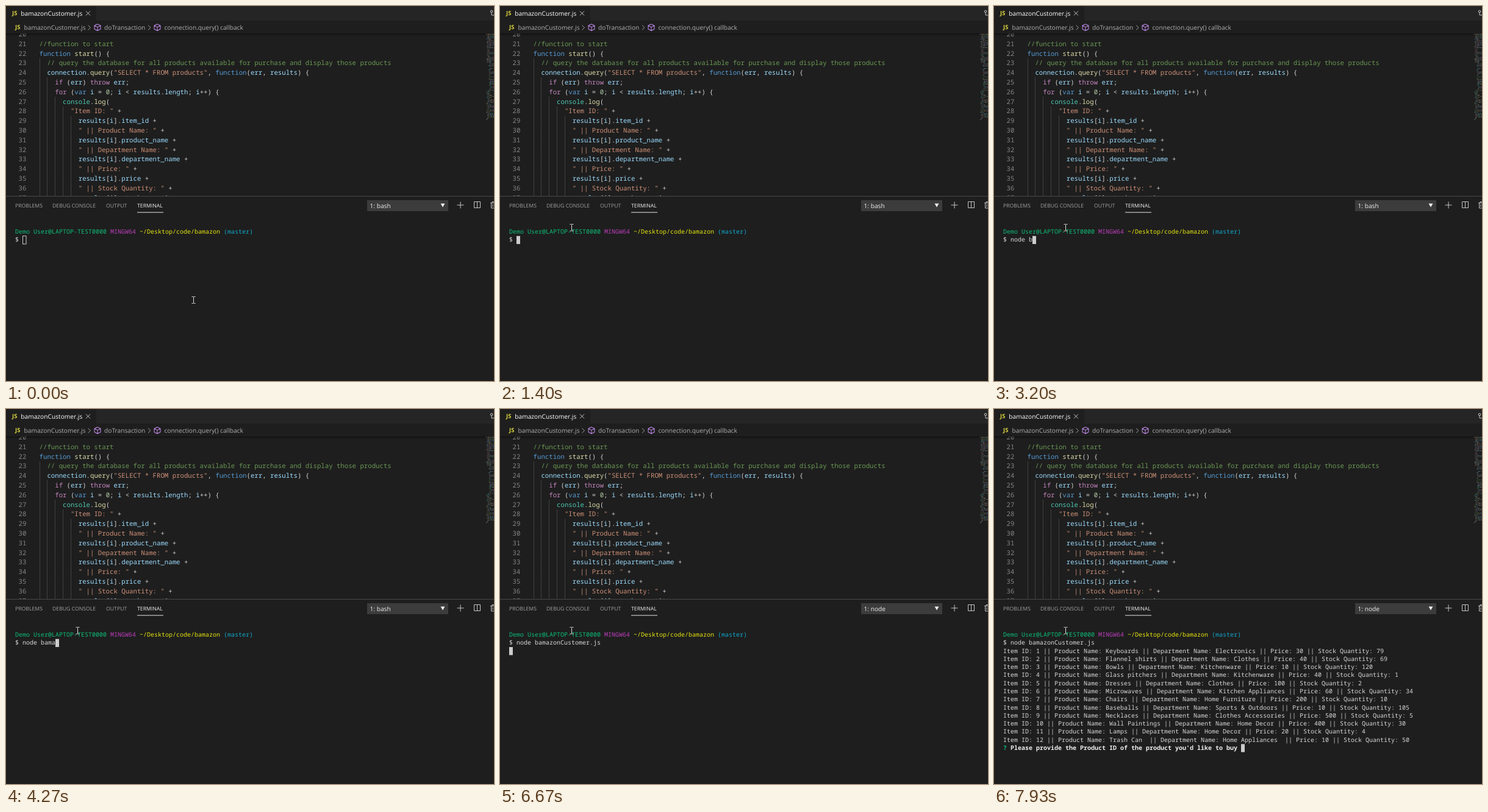
An HTML page that plays this animation: 800 px wide and 616 px high, repeating every 8000 ms.

```html
<!DOCTYPE html>
<html lang="en">
<head>
<meta charset="utf-8">
<title>Terminal session</title>
<style>
  html, body { margin: 0; width: 100%; height: 100%; overflow: hidden; background: #1e1e1e; }
  svg { display: block; width: 100%; height: 100%; }
  text { white-space: pre; text-rendering: geometricPrecision; fill: #d8d8d8; }
  .code { font: 500 10.69px "Noto Sans Mono", monospace; }
  .term { font: 500 10px "Noto Sans Mono", monospace; }
  .ui { font: 10.2px "Open Sans", sans-serif; }
  .tab { font: 8.7px "Open Sans", sans-serif; }
  .js { font: bold 9.5px "Open Sans", sans-serif; }
  .icon { fill: none; stroke: #c5c5c5; stroke-width: 1; }
</style>
</head>
<body>
<svg id="stage" viewBox="0 0 800 616">
  <defs>
    <clipPath id="editorClip"><rect y="45" width="800" height="267"/></clipPath>
    <linearGradient id="shadow" x2="0" y2="1">
      <stop stop-color="#000" stop-opacity=".45"/><stop offset="1" stop-color="#000" stop-opacity="0"/>
    </linearGradient>
    <path id="cube" d="M0-5.3 5-2.8V2.8L0 5.5-5 2.8V-2.8ZM-5-2.8 0-.3 5-2.8M0-.3V5.5"
      fill="none" stroke="#b180d7" stroke-width="1.1"/>
    <path id="chevron" d="M-2-3.8 2 0-2 3.8" fill="none" stroke="#a0a0a0"/>
  </defs>
  <rect width="800" height="616" fill="#1e1e1e"/>
  <rect x="148" width="652" height="24" fill="#252526"/>
  <g id="editor" clip-path="url(#editorClip)"></g>
  <rect y="45" width="786" height="4" fill="url(#shadow)"/>
  <g id="chrome">
    <path class="icon" d="M131 8.5 138 15.5M138 8.5 131 15.5"/>
    <circle class="icon" cx="796" cy="9" r="1.8"/>
    <path class="icon" d="M796 10.8V15H800"/>
    <use href="#chevron" x="136.5" y="35.5"/><use href="#chevron" x="235" y="35.5"/>
    <use href="#cube" x="150" y="35"/><use href="#cube" x="248" y="35"/>
    <path d="M0 312.5H800" stroke="#484848"/>
    <path d="M215 339H258" stroke="#e7e7e7"/>
    <rect x="592" y="319" width="133" height="18" fill="#3c3c3c"/>
    <path d="M712.5 324.5H719.5L716 330.5Z" fill="#f0f0f0"/>
    <path class="icon" d="M739.5 327H750.5M745 321.5V332.5"/>
    <path class="icon" d="M767.5 321.5H777.5V331.5H767.5ZM772.5 321.5V331.5"/>
    <path class="icon" d="M794 323.5H800M797 323V321.5H800M795.5 323.5V332H800M798 325.5V330"/>
  </g>
  <g id="terminal"></g>
  <rect id="caret" height="13.2"/>
  <path id="pointer" fill="none" stroke="#ddd"
    d="M-3-5.5H-1Q0-5.5 0-4.5Q0-5.5 1-5.5H3M0-4.5V4.5M-3 5.5H-1Q0 5.5 0 4.5Q0 5.5 1 5.5H3"/>
</svg>
<script>
const $ = id => document.getElementById(id);

function add(parent, tag, attrs, content = "") {
  const node = document.createElementNS("http://www.w3.org/2000/svg", tag);
  for (const key in attrs) node.setAttribute(key, attrs[key]);
  node.textContent = content;
  return parent.appendChild(node);
}

// runs: a string, or a list of [text, colour] pairs
function write(parent, kind, x, y, runs) {
  const node = add(parent, "text", { class: kind, x, y });
  if (typeof runs === "string") node.textContent = runs;
  else for (const [text, color] of runs) add(node, "tspan", { style: `fill:${color}` }, text);
  return node;
}

// Editor
const FIRST_LINE = 20, LINE_HEIGHT = 15.8, CODE_X = 54.6, CODE_CHAR = 6.414;
const source = `
//function to start
function start() {
  // query the database for all products available for purchase and display those products
  connection.query("SELECT * FROM products", function(err, results) {
    if (err) throw err;
    for (var i = 0; i < results.length; i++) {
      console.log(
        "Item ID: " +
          results[i].item_id +
          " || Product Name: " +
          results[i].product_name +
          " || Department Name: " +
          results[i].department_name +
          " || Price: " +
          results[i].price +
          " || Stock Quantity: " +
          results[i].stock_quantity +`.split("\n");

const tokens = /(\/\/.*)|("[^"]*")|\b(function|var)\b|\b(if|for|throw)\b|\b(start|query|log)\b|\b(console)\b|(\d+)|([a-z]\w*)|[^\w"\/]+/g;
const tokenColors = ["#6a9955", "#ce9178", "#569cd6", "#c586c0", "#dcdcaa", "#4ec9b0", "#b5cea8", "#9cdcfe"];

function highlight(line) {
  return [...line.matchAll(tokens)].map(match => {
    const group = match.slice(1).findIndex(part => part !== undefined);
    return [match[0], tokenColors[group] || "#d4d4d4"];
  });
}

source.forEach((line, i) => {
  const y = 50 + i * LINE_HEIGHT;
  const indent = line.search(/\S|$/);
  for (let col = 0; col < indent; col += 2)
    add($("editor"), "rect", {
      x: Math.round(CODE_X + col * CODE_CHAR), y: y - 11.7, width: 1, height: LINE_HEIGHT, fill: "#404040"
    });
  write($("editor"), "code", 20.5, y, [[String(FIRST_LINE + i), "#858585"]]);
  write($("editor"), "code", CODE_X + indent * CODE_CHAR, y, highlight(line.trim()));
});

// Minimap: three blocks of code, the middle one indented
let seed = 7;
const random = () => (seed = seed * 16807 % 2147483647) / 2147483647;
for (let row = 0; row < 69; row++) {
  const indent = row > 23 && row < 46 ? 4 + random() * 3 : random() * 3;
  const end = random() < .3 ? 793 : 800;
  for (let x = 787 + indent; x < end;) {
    const width = 1 + random() * 3;
    add($("editor"), "rect", {
      x, y: 46 + row * 2, width, height: 1, opacity: .4,
      fill: tokenColors[Math.floor(random() * 8)]
    });
    x += width + 1;
  }
}
add($("editor"), "path", { d: "M787 187.5 791 183", stroke: "#777" });

// Window chrome
const chrome = $("chrome");
const label = (kind, x, y, text, color) => write(chrome, kind, x, y, [[text, color]]);
label("js", 10, 15.3, "JS", "#d9d33f");
label("js", 15, 38.3, "JS", "#d9d33f");
label("ui", 24.3, 16, "bamazonCustomer.js", "#fff");
label("ui", 29.5, 39, "bamazonCustomer.js", "#b0b0b0");
label("ui", 161, 39, "doTransaction", "#b0b0b0");
label("ui", 259.5, 39, "connection.query() callback", "#b0b0b0");
label("tab", 15, 331, "PROBLEMS", "#a0a0a0");
label("tab", 76, 331, "DEBUG CONSOLE", "#a0a0a0");
label("tab", 164, 331, "OUTPUT", "#a0a0a0");
label("tab", 215, 331, "TERMINAL", "#f0f0f0");
const shellName = label("ui", 596.5, 331.5, "1: bash", "#f0f0f0").firstChild;

// Terminal
const TERM_X = 15, TERM_CHAR = 6, ROW_HEIGHT = 13.28;
const termLine = (parent, row, runs) =>
  write(parent, "term", TERM_X, 374 + row * ROW_HEIGHT, runs);

termLine($("terminal"), 0, [
  ["Demo User@LAPTOP-TEST0000", "#0dbc79"], [" MINGW64", "#bc3fbc"],
  [" ~/Desktop/code/bamazon", "#e5e510"], [" (master)", "#11a8cd"]
]);
const commandLine = termLine($("terminal"), 1, "$ ");
const output = add($("terminal"), "g", {});

const products = [
  ["Keyboards", "Electronics", 30, 79],
  ["Flannel shirts", "Clothes", 40, 69],
  ["Bowls", "Kitchenware", 10, 120],
  ["Glass pitchers", "Kitchenware", 40, 1],
  ["Dresses", "Clothes", 100, 2],
  ["Microwaves", "Kitchen Appliances", 60, 34],
  ["Chairs", "Home Furniture", 200, 10],
  ["Baseballs", "Sports & Outdoors", 10, 105],
  ["Necklaces", "Clothes Accessories", 500, 5],
  ["Wall Paintings", "Home Decor", 400, 30],
  ["Lamps", "Home Decor", 20, 4],
  ["Trash Can ", "Home Appliances ", 10, 50]
];
products.forEach(([name, department, price, stock], i) => termLine(output, 2 + i,
  `Item ID: ${i + 1} || Product Name: ${name} || Department Name: ${department} || Price: ${price} || Stock Quantity: ${stock}`));
const question = "Please provide the Product ID of the product you'd like to buy ";
termLine(output, 14, [["? ", "#0dbc79"], [question, "#f0f0f0"]]).style.fontWeight = "bold";

// Timeline
const LOOP = 8000, FOCUS = 1000, ENTER = 6400, RENAME = 6530, OUTPUT = 7870;
const command = "node bamazonCustomer.js";
const typing = [[1400, 0], [2100, 4], [4250, 9], [5580, 18], [6200, 23]];

function typedCount(t) {
  if (t <= typing[0][0]) return 0;
  for (let i = 1; i < typing.length; i++) {
    const [t0, n0] = typing[i - 1], [t1, n1] = typing[i];
    if (t < t1) return Math.floor(n0 + (n1 - n0) * (t - t0) / (t1 - t0));
  }
  return command.length;
}

function placeCaret(column, row, focused) {
  const inset = focused ? 0 : .5;
  const caret = $("caret");
  caret.setAttribute("x", TERM_X + column * TERM_CHAR + inset);
  caret.setAttribute("y", 364.5 + row * ROW_HEIGHT);
  caret.setAttribute("width", focused ? 6 : 5.5);
  caret.setAttribute("fill", focused ? "#ccc" : "none");
  caret.setAttribute("stroke", focused ? "none" : "#ccc");
}

function render(t) {
  const move = Math.min(1, Math.max(0, (t - 70) / 530));
  const eased = move * move * (3 - 2 * move);
  const settle = t > 900 ? 1 : 0;
  $("pointer").setAttribute("transform",
    `translate(${307.5 - 190 * eased} ${483 - 120 * eased + settle})`);

  const count = typedCount(t);
  commandLine.textContent = "$ " + command.slice(0, count);
  shellName.textContent = t < RENAME ? "1: bash" : "1: node";
  output.style.display = t < OUTPUT ? "none" : "";

  if (t >= OUTPUT) placeCaret(2 + question.length, 14, true);
  else if (t >= ENTER) placeCaret(0, 2, true);
  else placeCaret(2 + count, 1, t >= FOCUS);
}

const start = performance.now();
function frame() {
  render((performance.now() - start) % LOOP);
  requestAnimationFrame(frame);
}
frame();
</script>
</body>
</html>
```
